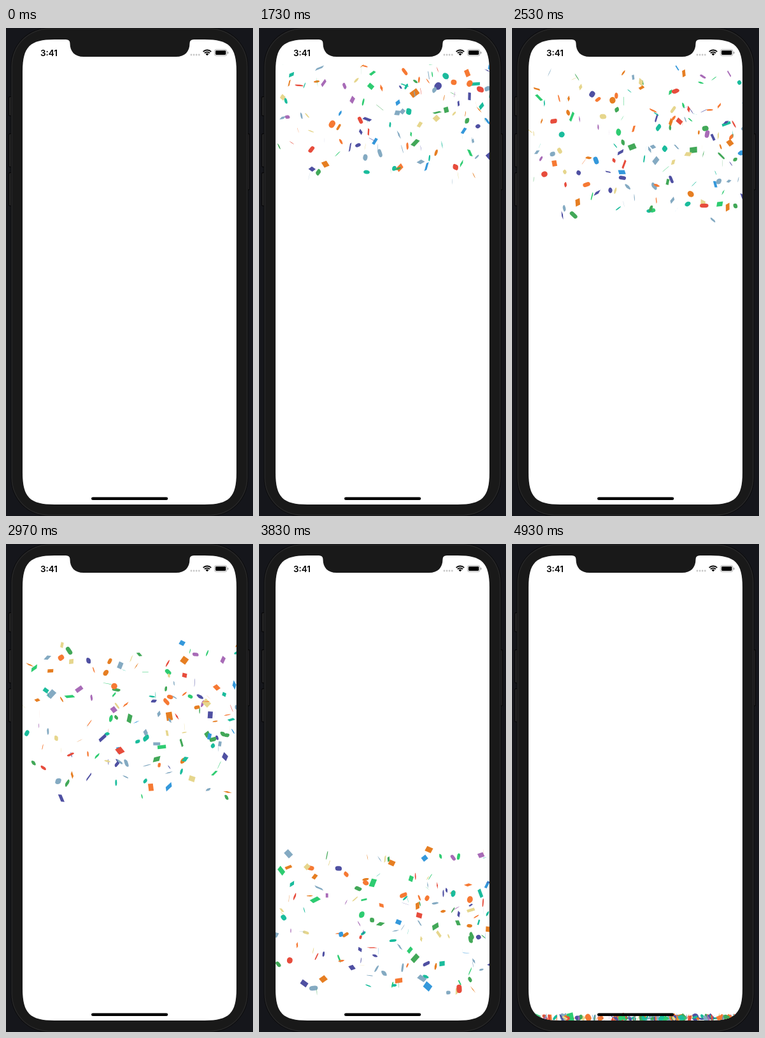
Animation, 388 px wide and 764 px high, one loop 4960 ms. Source, as an HTML page with a canvas:

```html
<!DOCTYPE html>
<html lang="en">
<head>
<meta charset="utf-8">
<title>Confetti</title>
<style>
  html, body { margin: 0; width: 100%; height: 100%; overflow: hidden; background: #15161b; }
  canvas { display: block; width: 388px; height: 764px; }
</style>
</head>
<body>
<canvas id="stage"></canvas>
<script>
const W = 388, H = 764, LOOP = 4960;
const SCREEN = { x: 26, y: 18, w: 336, h: 728 };
const PT = SCREEN.w / 375;          // pixels per layout point
const SAFE_TOP = 57.5;
const BURST = { start: 990, time: 835 };
const FALL = { start: 1825, time: 2500 };
const COUNT = 165;
const COLORS = ['#e67e22', '#2ecc71', '#3498db', '#84aac2', '#e6d68d', '#f67933',
                '#42a858', '#4f50a2', '#a86bb7', '#e74c3c', '#1abc9c'];

const canvas = document.getElementById('stage');
const ctx = canvas.getContext('2d');
const dpr = window.devicePixelRatio || 1;
canvas.width = W * dpr;
canvas.height = H * dpr;

function seeded(seed) {
  return () => {
    seed = (seed + 0x6d2b79f5) | 0;
    let n = Math.imul(seed ^ (seed >>> 15), 1 | seed);
    n = (n + Math.imul(n ^ (n >>> 7), 61 | n)) ^ n;
    return ((n ^ (n >>> 14)) >>> 0) / 4294967296;
  };
}

const rand = seeded(341);
const between = (a, b) => a + (b - a) * rand();

const pieces = Array.from({ length: COUNT }, () => ({
  left: rand(),
  top: between(0.7, 1),
  swing: between(0.2, 1) * 30 * PT,
  turnX: between(0.3, 1) * 10,
  turnY: between(0.3, 1) * 5,
  turnZ: between(0.3, 1) * 2,
  w: between(8, 16) * PT,
  h: between(6, 12) * PT,
  round: rand() < 0.5,
  color: COLORS[Math.floor(rand() * COLORS.length)]
}));

const clamp = (n) => Math.min(1, Math.max(0, n));

// 0 to 1 is the burst, 1 to 2 is the fall
function progress(t) {
  if (t < FALL.start) return 1 - (1 - clamp((t - BURST.start) / BURST.time)) ** 4;
  return 1 + clamp((t - FALL.start) / FALL.time) ** 2;
}

function swingAt(v) {
  if (v < 0.4) return -v / 0.4;
  if (v < 1.2) return (v - 0.8) / 0.4;
  return (2 - v) / 0.8;
}

function box(x, y, w, h, r, color) {
  ctx.fillStyle = color;
  ctx.beginPath();
  ctx.roundRect(x, y, w, h, r);
  ctx.fill();
}

function drawPiece(p, v) {
  const out = Math.min(v, 1);
  const startX = -10 * PT;
  const x = SCREEN.x + startX + (p.left * SCREEN.w - startX) * out;
  const lift = v < 1 ? p.top * v : Math.max(0, p.top - (v - 1));
  const y = SCREEN.y + SCREEN.h - lift * SCREEN.h;

  const angle = v * Math.PI;
  const [sa, ca] = [Math.sin(angle * p.turnX), Math.cos(angle * p.turnX)];
  const [sb, cb] = [Math.sin(angle * p.turnY), Math.cos(angle * p.turnY)];
  const [sc, cc] = [Math.sin(angle * p.turnZ), Math.cos(angle * p.turnZ)];

  ctx.save();
  ctx.translate(x + p.w / 2, y - p.h / 2);
  ctx.transform(cb * cc, ca * sc + sa * sb * cc, -cb * sc, ca * cc - sa * sb * sc, 0, 0);
  ctx.translate(swingAt(v) * p.swing, 0);
  box(-p.w / 2, -p.h / 2, p.w, p.h, p.round ? Math.min(p.w, p.h) / 2 : 0, p.color);
  ctx.restore();
}

// Rectangle with continuous corners: e is where the curve starts, c its control offset
function screenPath() {
  const { x, y, w, h } = SCREEN, r = x + w, b = y + h, e = 50, c = 11.4;
  const path = new Path2D();
  path.moveTo(x + e, y);
  path.lineTo(r - e, y);
  path.bezierCurveTo(r - c, y, r, y + c, r, y + e);
  path.lineTo(r, b - e);
  path.bezierCurveTo(r, b - c, r - c, b, r - e, b);
  path.lineTo(x + e, b);
  path.bezierCurveTo(x + c, b, x, b - c, x, b - e);
  path.lineTo(x, y + e);
  path.bezierCurveTo(x, y + c, x + c, y, x + e, y);
  return path;
}
const screenShape = screenPath();

function drawButton(x, y, w, h) {
  box(x - 1, y - 1, w + 2, h + 2, 2, '#060607');
  box(x, y, w, h, 1.5, '#262627');
}

function drawBody() {
  ctx.fillStyle = '#15161b';
  ctx.fillRect(0, 0, W, H);
  drawButton(5, 108, 6, 29);
  drawButton(5, 166, 6, 51);
  drawButton(5, 227, 6, 51);
  drawButton(377, 166, 5, 87);
  box(7.5, -0.5, 373, 765, 60, '#0c0c0d');
  box(8.5, 0.5, 371, 763, 59, '#272728');
  box(10, 2, 368, 760, 57.5, '#191919');
}

function drawNotch() {
  ctx.fillStyle = '#191919';
  ctx.beginPath();
  ctx.moveTo(94, 17);
  ctx.lineTo(94, 18);
  ctx.quadraticCurveTo(100.5, 18, 100.5, 24);
  ctx.bezierCurveTo(100.5, 37, 108, 45, 122, 45);
  ctx.lineTo(267, 45);
  ctx.bezierCurveTo(281, 45, 288.5, 37, 288.5, 24);
  ctx.quadraticCurveTo(288.5, 18, 295, 18);
  ctx.lineTo(295, 17);
  ctx.fill();
}

function drawWifi(x, y) {
  const wide = Math.PI * 0.25, up = -Math.PI / 2;
  ctx.strokeStyle = '#000';
  ctx.lineWidth = 1.9;
  for (const r of [8.8, 5.7]) {
    ctx.beginPath();
    ctx.arc(x, y, r, up - wide, up + wide);
    ctx.stroke();
  }
  ctx.fillStyle = '#000';
  ctx.beginPath();
  ctx.moveTo(x, y);
  ctx.arc(x, y, 3.5, up - wide, up + wide);
  ctx.fill();
}

function drawStatus() {
  ctx.fillStyle = '#000';
  ctx.font = '600 13.5px Inter, sans-serif';
  ctx.textAlign = 'center';
  ctx.fillText('3:41', 67.5, 43.6);

  for (let i = 0; i < 4; i++) box(289.6 + i * 4.1, 40.6, 2.8, 2.8, 1.4, '#c6c6c6');
  drawWifi(316, 43.3);

  ctx.strokeStyle = '#a3a3a3';
  ctx.lineWidth = 0.9;
  ctx.beginPath();
  ctx.roundRect(327.5, 33.8, 19.4, 9.6, 2.6);
  ctx.stroke();
  box(329, 35.3, 16.4, 6.6, 1.3, '#000');
  box(348, 37, 1.3, 3.4, [0, 1.3, 1.3, 0], '#8e8e8e');
}

function draw(t) {
  ctx.setTransform(dpr, 0, 0, dpr, 0, 0);
  drawBody();
  ctx.fillStyle = '#fff';
  ctx.fill(screenShape);

  if (t >= BURST.start) {
    const v = progress(t);
    ctx.save();
    ctx.clip(screenShape);
    ctx.beginPath();
    ctx.rect(0, SAFE_TOP, W, H);
    ctx.clip();
    for (const p of pieces) drawPiece(p, v);
    ctx.restore();
  }

  drawNotch();
  drawStatus();
  box(134, 734.4, 120.3, 4.5, 2.25, '#000');
}

const begin = performance.now();
function tick() {
  draw((performance.now() - begin) % LOOP);
  requestAnimationFrame(tick);
}
tick();
</script>
</body>
</html>
```
